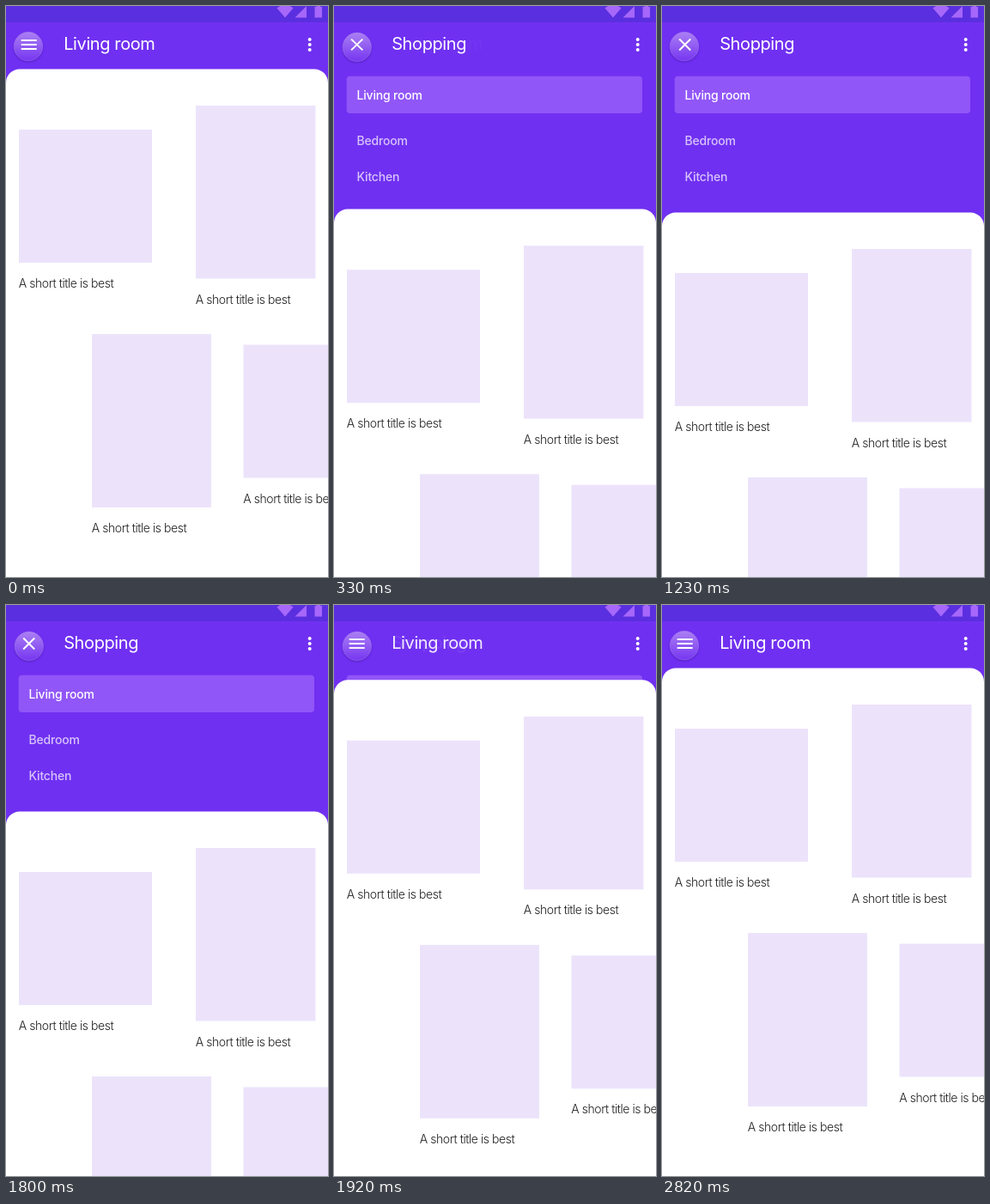
Animation of 375 by 665 pixels, one loop 2880 ms. Source, as an HTML page:

```html
<!DOCTYPE html>
<html lang="en">
<head>
<meta charset="utf-8">
<title>Room menu</title>
<style>
  html, body { margin: 0; width: 100%; height: 100%; overflow: hidden; background: #7030f1; }
  svg { display: block; width: 375px; height: 665px; }
  text { font-family: Inter, "Liberation Sans", sans-serif; }
  .head { font-size: 20px; font-weight: 400; letter-spacing: -.4px; fill: #fff; }
  .item { font-size: 14px; font-weight: 500; letter-spacing: -.2px; fill: #fff; }
  .dim { opacity: .72; }
  .label { font-size: 14px; font-weight: 300; letter-spacing: -.45px; fill: #222; }
  .line { stroke: #fff; stroke-width: 2; fill: none; }
</style>
</head>
<body>
<svg viewBox="0 0 375 665">
  <defs>
    <linearGradient id="glow" x1="0" y1="0" x2="0" y2="1">
      <stop offset="0" stop-color="#ab80f3"/>
      <stop offset="1" stop-color="#7636f1"/>
    </linearGradient>
    <filter id="soft" x="-30%" y="-30%" width="160%" height="160%">
      <feGaussianBlur stdDeviation="1.2"/>
    </filter>
  </defs>

  <rect width="375" height="665" fill="#7030f1"/>
  <rect width="375" height="19" fill="#5a2fdf"/>
  <g fill="#a667fa">
    <path d="M315.5 2.5Q325 -5 334.5 2.5L325 13.5Z"/>
    <path d="M350 0V13.5H336.5Z"/>
    <path d="M361.5 -1H366V1H368V13.5H359.5V1H361.5Z"/>
  </g>

  <g id="button">
    <circle cx="26" cy="48.2" r="17" fill="#3c1699" opacity=".5" filter="url(#soft)"/>
    <circle cx="26" cy="47" r="16.7" fill="url(#glow)" stroke="#a47af5" stroke-width=".5"/>
  </g>
  <path id="bars" class="line" d="M17.7 40H35.7M17.7 45H35.7M17.7 50H35.7"/>
  <g id="cross" class="line">
    <path id="slash"/>
    <path id="back"/>
  </g>

  <text id="room" class="head" x="67.2" y="51.2">Living room</text>
  <text id="shop" class="head" x="67.2" y="51.2">Shopping</text>
  <g fill="#fff">
    <circle cx="353.7" cy="39" r="2"/>
    <circle cx="353.7" cy="45" r="2"/>
    <circle cx="353.7" cy="51" r="2"/>
  </g>

  <rect x="14.7" y="81.7" width="344.3" height="43.3" rx="4" fill="#9156f7"/>
  <text class="item" x="26.5" y="109">Living room</text>
  <text class="item dim" x="26.5" y="162">Bedroom</text>
  <text class="item dim" x="26.5" y="204">Kitchen</text>

  <g id="sheet">
    <rect y="73.4" width="375" height="700" rx="16" fill="#fff"/>
  </g>
</svg>

<script>
const LOOP = 2880, STEP = 30, TRAVEL = 167;
const OPEN = 165, CLOSE = 1800;
const $ = id => document.getElementById(id);

// x, y, width, height of each card
const cards = [
  [15, 144, 155, 155],
  [221, 116, 139.5, 201.5],
  [100, 382, 139, 202],
  [276.5, 394.5, 155, 155]
];
$("sheet").innerHTML += cards.map(([x, y, w, h]) =>
  `<rect x="${x}" y="${y}" width="${w}" height="${h}" fill="#ece3fb"/>
   <text class="label" x="${x - .2}" y="${y + h + 29}">A short title is best</text>`).join("");

// Critically damped spring from 0 to 1
function spring(ms) {
  const a = .0344 * Math.max(0, ms);
  return 1 - (1 + a) * Math.exp(-a);
}

const ramp = (t, from, to) => Math.min(1, Math.max(0, (t - from) / (to - from)));
const press = (t, start) => ramp(t, start, start + 90) - ramp(t, start + 360, start + 480);

function setCross(p) {
  const angle = p * Math.PI / 4, half = 9.2;
  const dx = half * Math.cos(angle), dy = half * Math.sin(angle);
  const stroke = s => `M${26.7 - dx} ${45 - s * dy}L${26.7 + dx} ${45 + s * dy}`;
  $("slash").setAttribute("d", stroke(-1));
  $("back").setAttribute("d", stroke(1));
  $("cross").setAttribute("opacity", p);
}

function draw(t) {
  const p = spring(t - OPEN) - spring(t - CLOSE);
  const nudge = .8 * (press(t, 0) + press(t, 1680));
  $("sheet").setAttribute("transform", `translate(0 ${TRAVEL * p})`);
  $("button").setAttribute("transform", `translate(${nudge} ${nudge})`);
  $("room").setAttribute("opacity", 1 - p);
  $("shop").setAttribute("opacity", p);
  $("bars").setAttribute("opacity", 1 - p);
  setCross(p);
}

const begin = performance.now();
function tick(now) {
  const t = Math.max(0, now - begin) % LOOP;
  draw(Math.floor((t + 2) / STEP) * STEP);
  requestAnimationFrame(tick);
}
draw(0);
requestAnimationFrame(tick);
</script>
</body>
</html>
```
